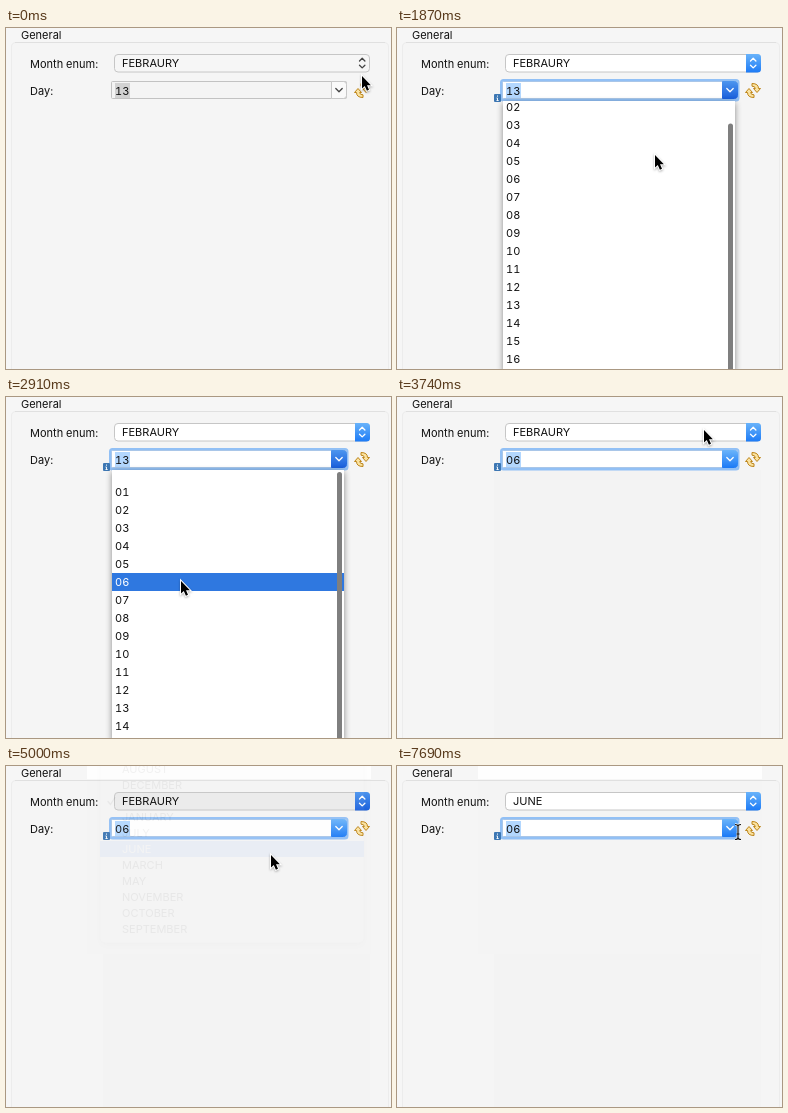
Animation, 385 px wide and 341 px high, one loop 8 s. Source, as an HTML page:

```html
<!DOCTYPE html>
<html lang="en">
<head>
<meta charset="utf-8">
<title>Month and day form</title>
<style>
html, body { margin: 0; width: 100%; height: 100%; overflow: hidden; background: #f6f6f6; }
svg { display: block; }
text { font: 11px Inter, "Liberation Sans", sans-serif; font-variant-numeric: tabular-nums; fill: #111; }
.line { fill: none; stroke-width: 1.3; stroke-linecap: round; stroke-linejoin: round; }
#list { filter: drop-shadow(0 2px 3px rgba(0, 0, 0, .45)); }
#menu { filter: drop-shadow(0 3px 4px rgba(0, 0, 0, .28)); }
#arrow { filter: drop-shadow(0 1px 1px rgba(0, 0, 0, .3)); }
</style>
</head>
<body>
<svg width="385" height="341" viewBox="0 0 385 341">
  <defs>
    <linearGradient id="blue" x2="0" y2="1"><stop stop-color="#69b3fa"/><stop offset="1" stop-color="#1d7bf6"/></linearGradient>
    <linearGradient id="deep" x2="0" y2="1"><stop stop-color="#4b94ee"/><stop offset="1" stop-color="#1a60dc"/></linearGradient>
    <clipPath id="listClip"><path d="M106 74h232v267h-232z"/></clipPath>
    <path id="hook" d="M348.500 64.500l3.500-4 3.500 4h-1.800q0 2.300 3.300 2.300v2.700q-6.500 0-6.500-5z"/>
    <path id="bar" d="M-3-7.500q3 0 3 2v11q0 2-3 2M3-7.500q-3 0-3 2v11q0 2 3 2M-1.500 2h3"/>
  </defs>

  <path d="M5.500 341V19q0-4.500 4.500-4.500H378q4.500 0 4.500 4.500V341" fill="#f5f5f5" stroke="#ececec"/>
  <path d="M9 14.500H379" stroke="#e0e0e0"/>
  <path id="listTrace" d="M97 73h267v268h-267z" fill="#f3f3f3"/>
  <g id="menuTrace">
    <path d="M81 15h284v173h-284z" fill="#f4f4f4"/>
    <path d="M81 0h284v13h-284z" fill="#fefefe"/>
  </g>
  <text x="15" y="11">General</text>
  <text x="24" y="40">Month enum:</text>
  <text x="24" y="67">Day:</text>

  <rect id="monthBox" x="108.500" y="26.500" width="255" height="17.500" rx="3.500" stroke="#c6c6c6"/>
  <path id="monthBtn" d="M349 26h11.500q3.500 0 3.500 3.500v11.500q0 3.500-3.500 3.500H349z"/>
  <path id="monthArrows" class="line" d="M353.500 33l2.700-2.700 2.700 2.700M353.500 37.200l2.700 2.700 2.700-2.700"/>
  <text id="month" x="116" y="39"></text>

  <rect id="ring" x="104.500" y="52.500" width="236.500" height="19.500" rx="2" fill="none" stroke="#92c0f5" stroke-width="3"/>
  <rect id="dayBox" x="105.500" y="53.500" width="235" height="17" rx="1"/>
  <path id="dayBtn" d="M325.500 53.500h12q3 0 3 3v11q0 3-3 3h-12z"/>
  <path id="dayArrow" class="line" d="M329.800 60.500l3.200 3.200 3.200-3.200"/>
  <rect id="mark" x="109" y="55" width="15" height="15"/>
  <text id="day" x="109" y="67"></text>
  <g fill="#fbe3a0" stroke="#bd8419">
    <use href="#hook"/>
    <use href="#hook" transform="rotate(180 356 62.500)"/>
  </g>
  <g id="info">
    <rect x="97" y="66" width="7" height="8" rx="1" fill="#3d77b3"/>
    <path d="M100.500 67.500v1.200M99.500 70h1v2.500m-1 0h2.200" fill="none" stroke="#fff" stroke-width=".9"/>
  </g>

  <g id="list">
    <path d="M106 73h232v270h-232z" fill="#fff"/>
    <g clip-path="url(#listClip)">
      <rect id="dayHover" x="106" y="176" width="232" height="18" fill="#2f78e0"/>
      <g id="rows"></g>
      <rect id="thumb" x="331" width="5" height="310" rx="2.500" fill="#7f7f7f"/>
    </g>
  </g>

  <g id="menu">
    <rect x="94" y="-30" width="264" height="207" rx="5" fill="#f5f5f5" stroke="#c4c4c4" stroke-width=".6"/>
    <rect id="monthHover" x="94" width="264" height="16" fill="#3b84f5"/>
    <path id="check" class="line" d="M102 35.500l2.500 3 4.500-7"/>
    <g id="months"></g>
  </g>

  <path id="arrow" d="M1 1v12.500l2.800-2.600 2.100 4.800 2.100-1-2-4.400h3.900z" stroke="#fff" stroke-width="2" paint-order="stroke"/>
  <g id="beam" fill="none">
    <use href="#bar" stroke="#fff" stroke-width="2.400"/>
    <use href="#bar" stroke="#111" stroke-width="1.200"/>
  </g>
</svg>
<script>
const LOOP = 8000, STEP = 208, ROW = 18, ITEM = 16;
const MONTHS = ["APRIL", "AUGUST", "DECEMBER", "FEBRAURY", "JANUARY", "JULY",
  "JUNE", "MARCH", "MAY", "NOVEMBER", "OCTOBER", "SEPTEMBER"];
const $ = id => document.getElementById(id);

// Pointer stops: step, x, y
const STOPS = [
  [0, 355, 47], [2, 335, 61], [6, 303, 107], [12, 211, 144], [14, 174, 183],
  [18, 306, 32], [21, 264, 88], [24, 264, 88], [26, 352, 82], [31, 352, 82],
  [32, 340, 80], [37, 341, 66]
];

const ease = u => {
  u = Math.min(1, Math.max(0, u));
  return u * u * (3 - 2 * u);
};
const pointer = n => {
  const i = STOPS.findLastIndex(s => s[0] <= n);
  const a = STOPS[i], b = STOPS[i + 1] || a;
  const u = ease((n - a[0]) / (b[0] - a[0] || 1));
  return [1, 2].map(k => Math.round(a[k] + (b[k] - a[k]) * u));
};
const set = (id, attrs) => {
  for (const k in attrs) $(id).setAttribute(k, attrs[k]);
};
const show = (id, on) => { $(id).style.display = on ? "" : "none"; };
const addText = (parent, x, y, label) => {
  const el = document.createElementNS("http://www.w3.org/2000/svg", "text");
  el.setAttribute("x", x);
  el.setAttribute("y", y);
  el.textContent = label;
  $(parent).append(el);
};
const light = (group, index) => [...$(group).children].forEach((el, i) => {
  el.style.fill = i === index ? "#fff" : "";
});

for (let d = 1; d <= 31; d++) addText("rows", 109, 81 + d * ROW, String(d).padStart(2, "0"));
MONTHS.forEach((m, i) => addText("months", 116, ITEM * i - 9, m));

function draw(t) {
  const n = Math.floor((t + 10) / STEP); // the screen refreshes in even steps
  const active = n >= 2, picking = n >= 14, picked = n >= 15, changed = n >= 25;
  const listOpen = n >= 3 && !picked;
  const menuOpen = n >= 19 && !changed;
  const tint = active ? "url(#blue)" : "none";
  const ink = active ? "#fff" : "#444";

  show("listTrace", picked);
  show("menuTrace", n >= 19);
  $("month").textContent = changed ? "JUNE" : "FEBRAURY";
  $("day").textContent = picked ? "06" : "13";

  set("monthBox", { fill: menuOpen ? "#ebebeb" : active ? "#fff" : "#f6f6f6" });
  set("monthBtn", { fill: menuOpen ? "url(#deep)" : tint });
  set("monthArrows", { stroke: ink });
  set("dayBox", { fill: active ? "#fff" : "#f4f4f4", stroke: active ? "#a9c6e8" : "#c2c2c2" });
  const face = listOpen ? "url(#deep)" : active ? tint : "#fafafa";
  set("dayBtn", { fill: face, stroke: active ? face : "#c8c8c8" });
  set("dayArrow", { stroke: ink });
  set("mark", { fill: active ? "#b3d7fe" : "#d2d2d2" });
  show("ring", active);
  show("info", active);

  const scroll = 68 * (1 - ease((n - 6) / 6));
  show("list", listOpen);
  set("rows", { transform: `translate(0 ${-Math.round(scroll)})` });
  set("thumb", { y: 75 + scroll * 0.6 });
  show("thumb", n >= 7);
  show("dayHover", picking);
  light("rows", picking ? 5 : -1);

  const pick = n < 20 ? 3 : n < 21 ? 4 : 6;
  show("menu", menuOpen);
  $("menu").style.opacity = n < 24 ? 0.98 : 0.05;
  set("monthHover", { y: ITEM * pick - 21 });
  set("check", { stroke: pick === 3 ? "#fff" : "#222" });
  light("months", pick);

  const beam = n >= 35;
  show("arrow", !beam);
  show("beam", beam);
  set(beam ? "beam" : "arrow", { transform: `translate(${pointer(n)})` });
}

function tick() {
  draw(performance.now() % LOOP);
  requestAnimationFrame(tick);
}
tick();
</script>
</body>
</html>
```
